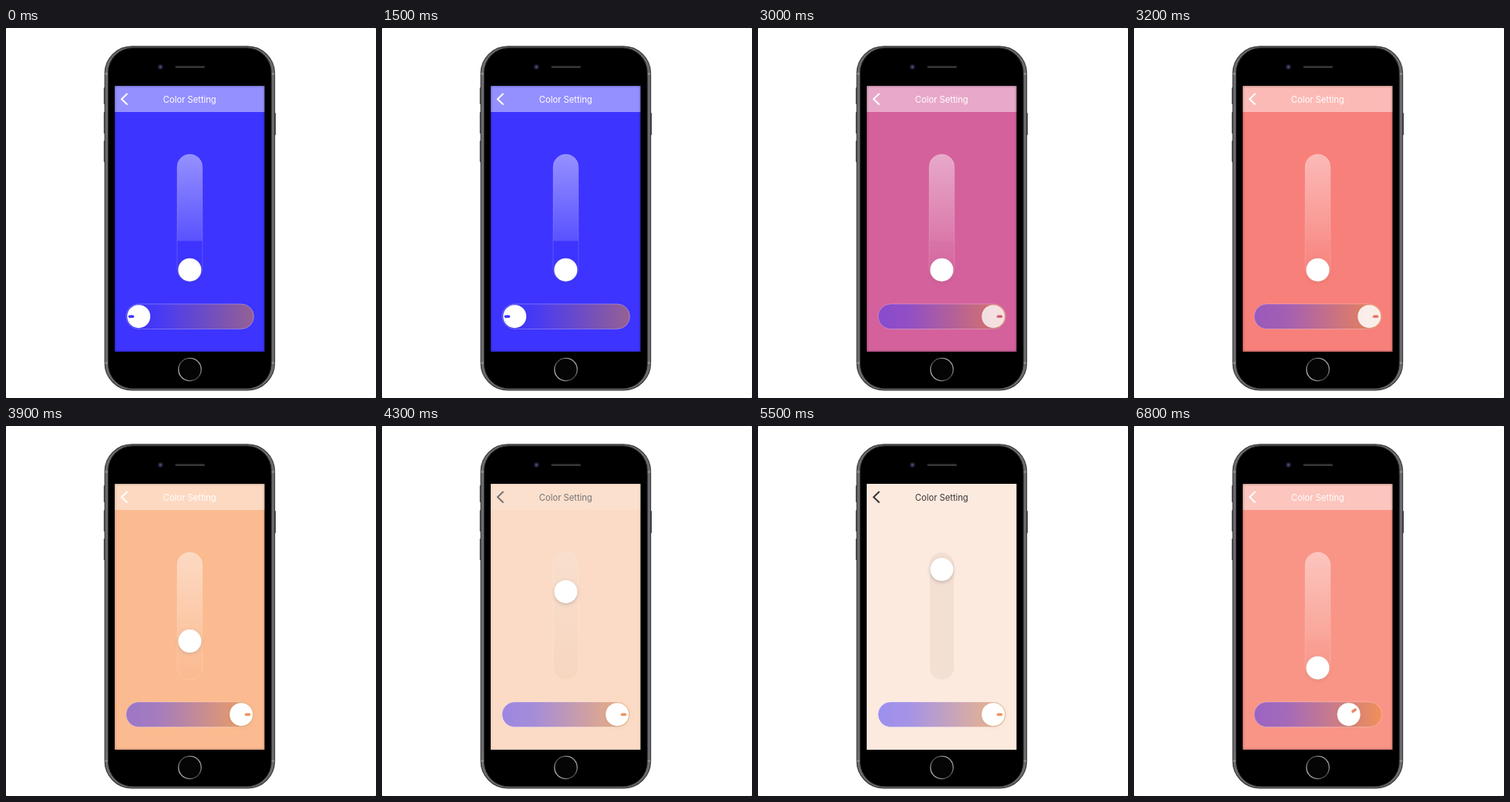
Animation of 480x480 px, one loop 6900 ms. Source, as an HTML page with a canvas:

```html
<!DOCTYPE html>
<html lang="en">
<head>
<meta charset="utf-8">
<title>Color Setting</title>
<style>
html, body { margin: 0; width: 100%; height: 100%; overflow: hidden; background: #fff; }
canvas { display: block; width: 480px; height: 480px; }
</style>
</head>
<body>
<canvas width="480" height="480"></canvas>
<script>
const ctx = document.querySelector('canvas').getContext('2d');
const LOOP = 6900, STEP = 100;
const BLUE = [61, 52, 255], PURPLE = [158, 50, 208], CORAL = [248, 128, 122];
const ORANGE = [250, 168, 114], SALMON = [249, 149, 135], CREAM = [252, 237, 228];
const HUES = [[0, BLUE], [2000, BLUE], [2700, PURPLE], [3200, CORAL], [3500, ORANGE],
  [6200, ORANGE], [6800, SALMON]];

const clamp = v => Math.min(1, Math.max(0, v));
const ramp = (t, a, b) => clamp((t - a) / (b - a));
const smooth = v => v * v * (3 - 2 * v);
const lerp = (a, b, k) => a + (b - a) * k;
const mix = (a, b, k) => a.map((v, i) => lerp(v, b[i], k));
const rgb = (c, a = 1) => `rgba(${c.map(Math.round)},${a})`;
const white = a => `rgba(255,255,255,${a})`;
const black = a => `rgba(0,0,0,${a})`;

function hueAt(t) {
  let i = HUES.length - 1;
  while (HUES[i][0] > t) i--;
  const [start, from] = HUES[i], [end, to] = HUES[i + 1] || [LOOP, from];
  return mix(from, to, ramp(t, start, end));
}

function box(x, y, w, h, r, fill, stroke, width = 1) {
  ctx.beginPath();
  ctx.roundRect(x, y, w, h, r);
  if (fill) { ctx.fillStyle = fill; ctx.fill(); }
  if (stroke) { ctx.strokeStyle = stroke; ctx.lineWidth = width; ctx.stroke(); }
}

function gradient(x0, y0, x1, y1, ...stops) {
  const g = ctx.createLinearGradient(x0, y0, x1, y1);
  stops.forEach(([at, color]) => g.addColorStop(at, color));
  return g;
}

function disc(x, y, r, fill, stroke, width) {
  box(x - r, y - r, 2 * r, 2 * r, r, fill, stroke, width);
}

function knob(x, y, shadow, alpha = 1) {
  ctx.save();
  ctx.shadowColor = black(shadow);
  ctx.shadowBlur = 4;
  ctx.shadowOffsetY = 1.5;
  disc(x, y, 15, white(alpha));
  ctx.restore();
}

function phone() {
  ctx.fillStyle = '#fff';
  ctx.fillRect(0, 0, 480, 480);
  ctx.fillStyle = '#bbb';
  for (const x of [0, 479]) for (const y of [0, 479]) ctx.fillRect(x, y, 1, 1);

  for (const [y, h] of [[77, 22], [109, 28], [146, 28]]) box(126.8, y, 2, h, 1, '#4a4a4d');
  box(347.5, 110, 2.5, 29, 1, '#4a4a4d');
  box(128.2, 23.8, 220.3, 446, 35, '#6c6c70', '#39393c', 1.2);
  box(132.5, 25.8, 211.7, 442, 32, '#000', '#2c2c2e');
  ctx.fillStyle = '#88888c';
  for (const y of [58, 433]) {
    ctx.fillRect(128.5, y, 3.5, 3);
    ctx.fillRect(344.7, y, 3.5, 3);
  }
  disc(200.4, 50.5, 3.2, '#23233c');
  disc(200.4, 50.5, 1.5, '#474778');
  box(219.5, 49.3, 38.5, 2.6, 1.3, '#353538');
  disc(238.5, 443, 14.7, '#050505', gradient(226, 452, 251, 434,
    [0, '#ccc'], [.35, '#555'], [.65, '#555'], [1, '#bbb']), 1.2);
}

function header(light) {
  const dark = smooth(ramp(light, .55, .85));
  const ink = rgb(mix([255, 255, 255], [58, 54, 54], dark));
  ctx.fillStyle = white(.45 * (1 - dark));
  ctx.fillRect(141, 75, 195, 34);
  ctx.strokeStyle = ink;
  ctx.lineWidth = 2;
  ctx.beginPath();
  ctx.moveTo(157.5, 85);
  ctx.lineTo(150, 92.3);
  ctx.lineTo(157.5, 99.5);
  ctx.stroke();
  ctx.fillStyle = ink;
  ctx.font = '11.2px Inter, sans-serif';
  ctx.textAlign = 'center';
  ctx.fillText('Color Setting', 238.3, 97.2);
}

function brightnessSlider(t, light) {
  const pale = smooth(ramp(light, .5, .95)), fade = 1 - pale;
  const low = t < 2000 ? 0 : .12;
  box(223, 164, 31, 165, 15.5, rgb([150, 90, 70], .08 * pale));
  box(222, 163.8, 32.8, 165.5, 16.4, gradient(0, 163, 0, 329,
    [0, white(.46 * fade)], [.68, white(.15 * fade)], [.685, white(low * fade)],
    [1, white(0)]), white(.2 * fade), .8);
  knob(238.4, lerp(313.7, 180.3, light), .1 + .12 * light);
}

function hueSlider(t, hue) {
  const pos = t < 4000 ? smooth(ramp(t, 2000, 2650)) : 1 - .2 * ramp(t, 6500, 6800);
  const alpha = t < 2000 || t > 3500 ? 1 : t < 2700
    ? lerp(1, .66, ramp(t, 2000, 2700))
    : lerp(.66, 1, ramp(t, 2700, 3500));
  box(155.8, 358, 165.7, 32.5, 16.25, gradient(155, 0, 322, 0,
    [0, rgb(BLUE, .5)], [.25, rgb([80, 62, 235], .5)], [1, rgb([232, 138, 45], .52)]),
    white(.3), .9);
  const x = lerp(172.2, 305.2, pos);
  knob(x, 374.2, .06, alpha);
  ctx.save();
  ctx.translate(x, 374.2);
  ctx.rotate(-Math.PI * (1 - pos));
  const near = lerp(6, 4.5, pos);
  box(near, -1.8, 7.5, 3.6, 1.8, rgb(mix(hue, [200, 90, 40], .3 * pos)));
  ctx.restore();
}

function draw(now) {
  const t = Math.floor(now % LOOP / STEP) * STEP;
  const light = smooth(ramp(t, 3500, 4700)) - smooth(ramp(t, 5400, 6200));
  const hue = hueAt(t);
  phone();
  ctx.save();
  ctx.beginPath();
  ctx.rect(141, 75, 194.5, 345);
  ctx.clip();
  ctx.fillStyle = rgb(mix(hue, CREAM, light));
  ctx.fillRect(141, 75, 195, 345);
  header(light);
  brightnessSlider(t, light);
  hueSlider(t, hue);
  ctx.shadowColor = black(.6 * (1 - light));
  ctx.shadowBlur = 3;
  ctx.strokeStyle = '#000';
  ctx.lineWidth = 2;
  ctx.strokeRect(140, 74, 196.5, 347);
  ctx.restore();
}

const start = performance.now();
(function tick() {
  draw(performance.now() - start);
  requestAnimationFrame(tick);
})();
</script>
</body>
</html>
```
